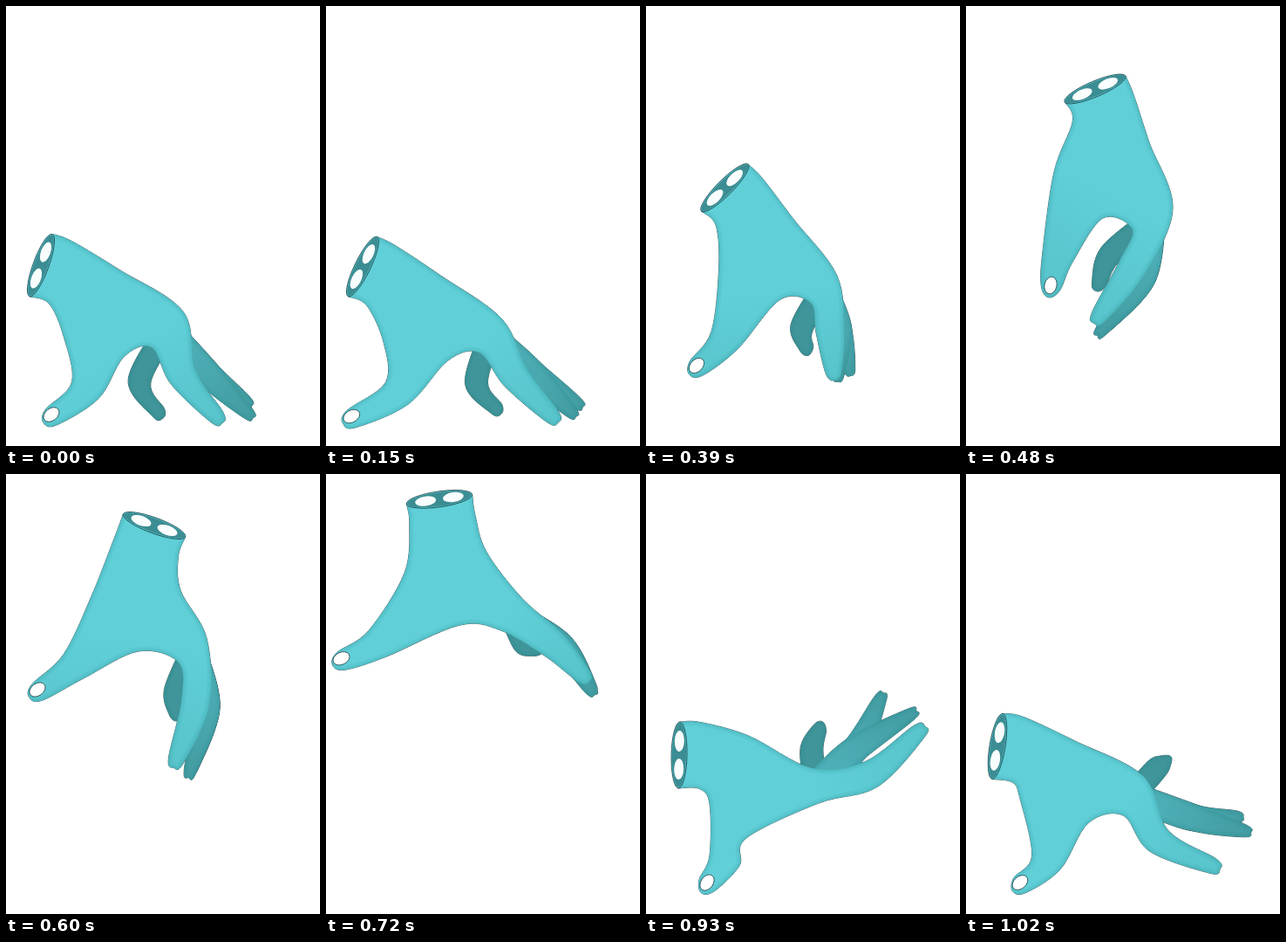
An HTML page with a canvas that plays this animation: 360x504 px, repeating every 1050 ms.

```html
<!DOCTYPE html>
<html lang="en">
<head>
<meta charset="utf-8">
<title>Leaping hand</title>
<style>
html, body { margin: 0; width: 100%; height: 100%; overflow: hidden; background: #fff; }
canvas { display: block; }
</style>
</head>
<body>
<canvas id="stage" width="360" height="504"></canvas>
<script>
const ctx = document.getElementById('stage').getContext('2d');
const LOOP = 1050, STEP = 30, WRIST = 38;
const EDGE = 'rgba(12, 48, 52, .75)';

// Each key pose holds a few joints; all outlines are built from these.
// wrist: centre, angle, bulge of the back; palm: knuckle, index web, thumb web, heel
// thumb, index, far: middle joint, tip; pair: shared joint, two tips
const poses = [];
const key = (time, joints) => poses.push({ time, joints });

// standing
key(0, {
  wrist: [40, 297, -1.22, 4], palm: [203,350, 167,391, 135,402, 66,378],
  thumb: [91,440, 52,471], index: [203,425, 242,471],
  pair: [232,422, 276,454, 278,467], far: [153,430, 175,466] });

// crouched
key(300, {
  wrist: [44, 300, -1.02, 2], palm: [200,362, 187,403, 148,408, 66,388],
  thumb: [75,447, 19,475], index: [232,426, 278,469],
  pair: [240,414, 301,456, 285,461], far: [192,433, 216,449] });

// leaping
key(480, {
  wrist: [148, 95, -.4, 0], palm: [237,232, 191,256, 157,243, 101,190],
  thumb: [105,288, 97,323], index: [190,300, 152,356],
  pair: [202,312, 165,363, 155,372], far: [165,285, 152,319] });

// rising
key(600, {
  wrist: [170, 59, .35, -18], palm: [230,188, 198,216, 152,203, 98,140],
  thumb: [78,220, 36,250], index: [217,262, 195,328],
  pair: [230,268, 214,335, 211,341], far: [194,250, 195,275] });

// top of the leap
key(700, {
  wrist: [136, 25, -.07, -14], palm: [226,140, 200,176, 152,170, 90,108],
  thumb: [58,191, 17,211], index: [256,196, 280,244],
  pair: [270,195, 294,248, 290,252], far: [222,195, 233,205] });

// stretched
key(810, {
  wrist: [103, 104, -.47, -13], palm: [215,188, 197,233, 158,238, 91,205],
  thumb: [75,259, 29,279], index: [280,211, 348,193],
  pair: [270,238, 330,232, 350,236], far: [250,202, 268,192] });

// landing
key(930, {
  wrist: [38, 322, -1.55, 11], palm: [190,337, 198,377, 115,417, 73,378],
  thumb: [90,443, 70,471], index: [258,344, 313,295],
  pair: [240,315, 269,257, 304,275], far: [190,315, 199,291] });

// settling
key(1020, {
  wrist: [36, 312, -1.41, 5], palm: [203,346, 180,391, 140,400, 62,372],
  thumb: [92,445, 62,471], index: [221,420, 283,449],
  pair: [262,394, 311,393, 320,409], far: [218,338, 229,329] });

const wrap = i => (i + poses.length) % poses.length;
const span = i => (poses[wrap(i + 1)].time - poses[wrap(i)].time + LOOP) % LOOP;

// Cubic between keys that never overshoots them
function ease(a, b, c, d, h0, h1, h2, u) {
  const s0 = (b - a) / h0, s1 = (c - b) / h1, s2 = (d - c) / h2;
  const mean = (p, q) => p * q > 0 ? 2 * p * q / (p + q) : 0;
  const v = 1 - u;
  return b * v * v * (1 + 2 * u) + c * u * u * (3 - 2 * u)
    + h1 * u * v * (mean(s0, s1) * v - mean(s1, s2) * u);
}

function poseAt(t) {
  let i = poses.length - 1;
  while (poses[i].time > t) i--;
  const [p, q, r, s] = [-1, 0, 1, 2].map(k => poses[wrap(i + k)].joints);
  const h = [span(i - 1), span(i), span(i + 1)];
  const u = (t - poses[i].time) / h[1];
  const now = {};
  for (const part in q)
    now[part] = q[part].map((v, n) => ease(p[part][n], v, r[part][n], s[part][n], ...h, u));
  return now;
}

const pairs = list => list.flatMap((v, i) => i % 2 ? [] : [[v, list[i + 1]]]);
const move = (p, d, k) => [p[0] + d[0] * k, p[1] + d[1] * k];
const middle = (p, q) => [(p[0] + q[0]) / 2, (p[1] + q[1]) / 2];
const left = d => [d[1], -d[0]];
function aim(p, q) {
  const x = q[0] - p[0], y = q[1] - p[1], l = Math.hypot(x, y) || 1;
  return [x / l, y / l];
}

// Points down one side of a finger, round the tip and back
function finger(base, joint, tip, wide, thin) {
  const n = left(aim(base, tip)), d = aim(joint, tip), m = left(d);
  return [move(joint, n, wide), move(tip, m, thin), move(tip, d, thin),
          move(tip, m, -thin), move(joint, n, -wide)];
}

// A finger with its own root
function limb(base, joint, tip, wide, thin) {
  const n = left(aim(base, joint));
  return curve([move(base, n, wide), ...finger(base, joint, tip, wide, thin),
                move(base, n, -wide)]);
}

// Smooth open curve, closed by a straight edge
function curve(pts) {
  const at = i => pts[Math.max(0, Math.min(pts.length - 1, i))];
  const path = new Path2D();
  path.moveTo(...pts[0]);
  for (let i = 0; i < pts.length - 1; i++) {
    const [a, b, c, d] = [-1, 0, 1, 2].map(k => at(i + k));
    path.bezierCurveTo(
      b[0] + (c[0] - a[0]) / 6, b[1] + (c[1] - a[1]) / 6,
      c[0] - (d[0] - b[0]) / 6, c[1] - (d[1] - b[1]) / 6, ...c);
  }
  path.closePath();
  return path;
}

function fade(p, q, from, to) {
  const g = ctx.createLinearGradient(...p, ...q);
  g.addColorStop(0, from);
  g.addColorStop(1, to);
  return g;
}

// Filled shape with soft shade along the inside of its edge
function solid(path, fill) {
  ctx.fillStyle = fill;
  ctx.fill(path);
  ctx.save();
  ctx.clip(path);
  ctx.strokeStyle = 'rgba(30, 115, 125, .06)';
  for (const w of [3, 6, 10]) {
    ctx.lineWidth = w;
    ctx.stroke(path);
  }
  ctx.restore();
}

function outline(path) {
  ctx.strokeStyle = EDGE;
  ctx.lineWidth = 1;
  ctx.stroke(path);
}

function oval(c, rx, ry, angle, fill, line) {
  const path = new Path2D();
  path.ellipse(...c, rx, ry, angle, 0, 2 * Math.PI);
  ctx.fillStyle = fill;
  ctx.fill(path);
  if (line) outline(path);
}

function draw(t) {
  const now = poseAt(t);
  const [x, y, angle, bulge] = now.wrist, centre = [x, y];
  const [knuckle, web, crotch, heel] = pairs(now.palm);
  const [thumbMid, thumbTip] = pairs(now.thumb);
  const [indexMid, indexTip] = pairs(now.index);
  const [pairMid, ...tips] = pairs(now.pair);
  const root = middle(knuckle, web);

  const across = [Math.cos(angle), Math.sin(angle)], inward = [-across[1], across[0]];
  const back = move(centre, across, WRIST), front = move(centre, across, -WRIST);
  const hand = curve([
    back, move(back, inward, 24),
    move(middle(back, knuckle), left(aim(back, knuckle)), bulge), knuckle,
    ...finger(root, indexMid, indexTip, 16, 9), web, crotch,
    ...finger(middle(crotch, heel), thumbMid, thumbTip, 18, 11), heel,
    move(front, inward, 24), front]);
  const far = limb(root, ...pairs(now.far), 13, 8);
  const others = tips.map(tip => limb(root, pairMid, tip, 15, 7));

  ctx.fillStyle = '#fff';
  ctx.fillRect(0, 0, 360, 504);
  [far, ...others, hand].forEach(outline);
  solid(far, '#40959a');
  for (const path of others) solid(path, fade(root, tips[0], '#50b4bc', '#449ea4'));
  solid(hand, fade(root, indexTip, '#60cfd8', '#58c4cc'));

  oval(centre, WRIST, 9, angle, '#62ced7', true);
  oval(centre, WRIST - 1, 8, angle, '#3b8d93');
  for (const k of [-16, 16]) oval(move(centre, across, k), 12, 5.5, angle, '#f8fdfd');
  const along = aim(thumbMid, thumbTip);
  oval(move(thumbTip, [0, -1], 3), 10, 7, Math.atan2(along[1], along[0]), '#fff', true);
}

const start = performance.now();
function tick() {
  const t = (performance.now() - start) % LOOP;
  draw(Math.floor(t / STEP) * STEP);
  requestAnimationFrame(tick);
}
tick();
</script>
</body>
</html>
```
